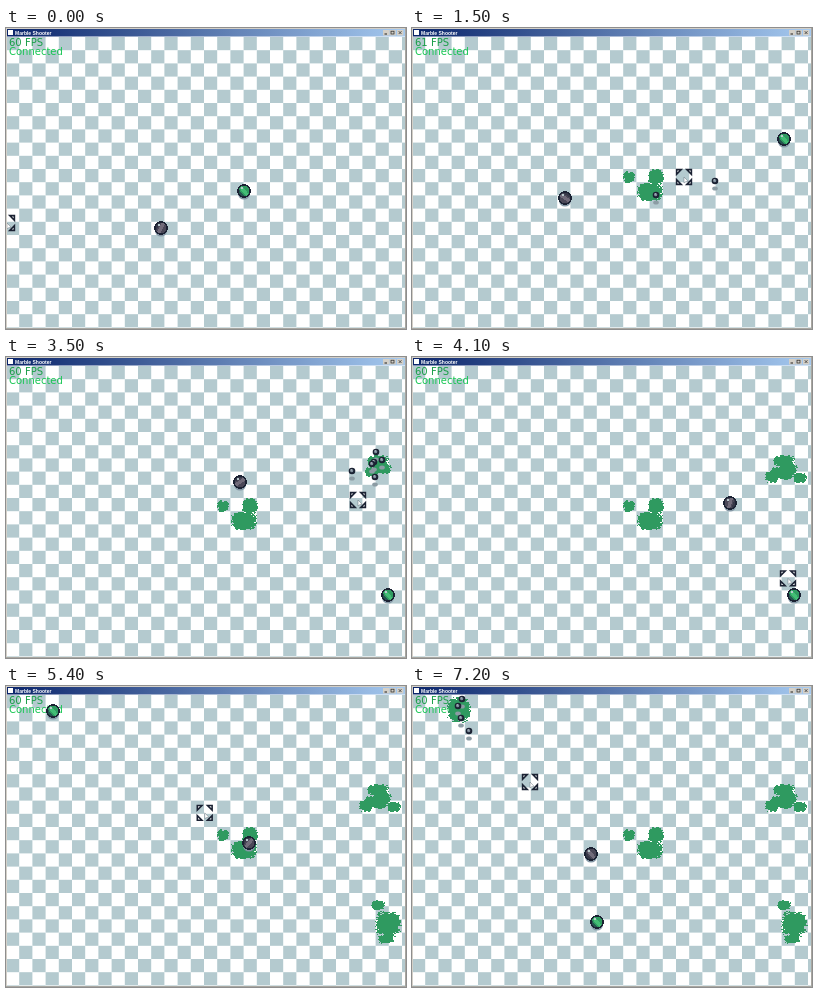
Recreate the animation shown at these times as an HTML page with a canvas. Size 400 by 301 pixels, loop 7.3 s.

```html
<!DOCTYPE html>
<html lang="en">
<head>
<meta charset="utf-8">
<title>Marble Shooter</title>
<style>
html, body { margin: 0; width: 100%; height: 100%; overflow: hidden; background: #fff; }
canvas { display: block; }
</style>
</head>
<body>
<canvas id="stage" width="400" height="301"></canvas>
<script>
const ctx = document.getElementById('stage').getContext('2d');
const LOOP = 7300, STEP = 100, TILE = 13.2, TOP = 9;
const INK = '#1b2233', PAINT = '#2f9a60', FLOOR = '#b4cacf';

// Paths: [time, x, y]
const playerPath = [[0, 155, 200], [300, 155, 200], [900, 153, 170], [1500, 153, 170], [2200, 237, 125],
  [3500, 234, 125], [4250, 339, 151], [4700, 339, 151], [5900, 175, 162], [6100, 175, 162], [7200, 179, 168]];
const aimPath = [[0, 1, 195], [600, 236, 165], [1500, 272, 149], [2100, 369, 125], [2600, 369, 136],
  [3500, 352, 143], [4250, 382, 241], [4700, 382, 241], [5000, 377, 236], [5700, 65, 45], [6100, 65, 45], [7200, 118, 96]];
const targets = [[0, 238, 163], [1200, 372, 111], [3200, 382, 238], [5100, 47, 25], [7000, 185, 236]];

// Shots: [fired, time at point, x, y, stops there]
const shots = [[600, 1000, 238, 163, 1], [700, 1200, 236, 162, 1], [750, 1500, 303, 153], [1050, 1500, 244, 167],
  [2000, 2600, 387, 122], [2050, 2600, 358, 114], [2500, 3200, 372, 111, 1],
  [2830, 3500, 370, 95], [2840, 3500, 369, 120], [2850, 3500, 368, 105],
  [2860, 3500, 376, 103], [2880, 3500, 366, 107], [2940, 3500, 346, 114],
  [4280, 4700, 384, 222], [4360, 4700, 371, 211], [4440, 4700, 360, 199], [4590, 4700, 348, 171],
  [6060, 7000, 47, 25, 1], [6190, 7200, 50, 13], [6205, 7200, 46, 20], [6260, 7200, 49, 32], [6330, 7200, 57, 45]];

// Paint blobs: [time, x, y, rx, ry]
const blobs = [[1200, 217, 149, 6, 6], [1200, 244, 149, 8, 8], [1200, 238, 164, 13, 10],
  [3200, 372, 104, 11, 6], [3200, 376, 112, 10, 5], [3200, 365, 115, 6, 5],
  [3600, 360, 120, 7, 6], [3600, 374, 119, 8, 4], [3600, 388, 121, 7, 5],
  [5100, 372, 219, 7, 5], [5100, 382, 238, 13, 13], [5100, 380, 253, 8, 5], [7000, 47, 24, 12, 13]];

function along(path, t) {
  const i = path.findIndex(p => p[0] > t);
  if (i < 0) return path[path.length - 1].slice(1);
  const [t0, x0, y0] = path[i - 1], [t1, x1, y1] = path[i];
  const k = (t - t0) / (t1 - t0);
  return [x0 + (x1 - x0) * k, y0 + (y1 - y0) * k];
}

function hash(x, y) {
  const v = Math.sin(x * 12.9898 + y * 78.233) * 43758.5453;
  return v - Math.floor(v);
}

function rect(x, y, w, h, color) {
  ctx.fillStyle = color;
  ctx.fillRect(x, y, w, h);
}

function oval(x, y, rx, ry, color) {
  ctx.fillStyle = color;
  ctx.beginPath();
  ctx.ellipse(x, y, rx, ry, 0, 0, Math.PI * 2);
  ctx.fill();
}

function label(text, x, y, font, color) {
  ctx.font = font;
  ctx.fillStyle = color;
  ctx.fillText(text, x, y);
}

function drawFloor() {
  rect(0, 0, 400, 301, '#fff');
  for (let row = 0; row < 23; row++)
    for (let col = row % 2; col < 31; col += 2)
      rect(col * TILE, TOP + row * TILE, TILE, TILE, FLOOR);
}

function drawBlob([, cx, cy, rx, ry]) {
  for (let y = Math.floor(cy - ry); y <= cy + ry; y++)
    for (let x = Math.floor(cx - rx); x <= cx + rx; x++) {
      const d = Math.abs((x + .5 - cx) / rx) ** 3 + Math.abs((y + .5 - cy) / ry) ** 3;
      const rough = hash(Math.floor(x / 2), y) * .75;
      if (d + rough < 1.15) rect(x, y, 1, 1, PAINT);
    }
}

function drawMarble([cx, cy], colors, angle) {
  const [base, dark, light] = colors, ox = Math.round(cx), oy = Math.round(cy);
  oval(ox, oy + 3, 6, 5.5, '#8497a5');
  for (let y = -7; y < 7; y++)
    for (let x = -7; x < 7; x++) {
      const px = x + .5, py = y + .5, r = Math.hypot(px, py);
      if (r > 6.8) continue;
      const band = px * Math.cos(angle) + py * Math.sin(angle);
      let color = Math.abs(band) < 1.7 ? light : band < -3 ? dark : base;
      if (r > 5.3) color = INK;
      else if (Math.hypot(px + 2, py + 3) < 1.1) color = '#b9c9cd';
      rect(ox + x, oy + y, 1, 1, color);
    }
}

function drawShot([fired, at, x1, y1, stops], t) {
  if (t < fired || (stops && t >= at)) return;
  const [x0, y0] = along(playerPath, fired), k = (t - fired) / (at - fired);
  const x = x0 + (x1 - x0) * k, y = y0 + (y1 - y0) * k;
  oval(x, y + 7.5, 2.8, 2, '#8c9ca4');
  oval(x, y, 3.3, 3.3, INK);
  oval(x - .3, y - .3, 1.6, 1.6, '#7f8d9b');
  rect(x - 1.3, y - 1.6, 1, 1, '#d5e0e2');
}

function drawAim([x, y]) {
  ctx.save();
  ctx.translate(x, y);
  ctx.lineWidth = 1.6;
  ctx.strokeStyle = INK;
  ctx.fillStyle = '#fff';
  for (let i = 0; i < 4; i++) {
    ctx.beginPath();
    ctx.moveTo(7.4, -7.4);
    ctx.lineTo(2.8, -7.4);
    ctx.lineTo(7.4, -2.8);
    ctx.closePath();
    ctx.fill();
    ctx.stroke();
    ctx.rotate(Math.PI / 2);
  }
  ctx.beginPath();
  ctx.moveTo(0, 0);
  ctx.lineTo(0, 6);
  ctx.lineTo(1.6, 4.8);
  ctx.lineTo(4.2, 4.4);
  ctx.closePath();
  ctx.lineWidth = .5;
  ctx.strokeStyle = '#66727c';
  ctx.fill();
  ctx.stroke();
  ctx.restore();
}

function drawWindow() {
  const bar = ctx.createLinearGradient(0, 0, 400, 0);
  bar.addColorStop(0, '#0a246a');
  bar.addColorStop(1, '#a6caf0');
  rect(0, 0, 400, 1, '#d4d0c8');
  rect(1, 1, 398, 7.5, bar);
  rect(0, 0, 1, 301, '#d4d0c8');
  rect(399, 0, 1, 301, '#a9a7a1');
  rect(0, 300, 400, 1, '#a9a7a1');
  rect(2, 2, 5, 5, '#fff');
  label('Marble Shooter', 9, 6.7, 'bold 5px "Liberation Sans", sans-serif', '#fff');
  for (const x of [377, 383.5, 391]) rect(x, 2, 6.3, 5.5, '#d4d0c8');
  rect(378.5, 5.5, 2.5, 1, '#222');
  ctx.strokeStyle = '#222';
  ctx.lineWidth = .7;
  ctx.strokeRect(385, 3.2, 3, 2.8);
  ctx.beginPath();
  ctx.moveTo(392.7, 3.2);
  ctx.lineTo(395.5, 6);
  ctx.moveTo(395.5, 3.2);
  ctx.lineTo(392.7, 6);
  ctx.stroke();
}

function draw(t) {
  drawFloor();
  const font = '10px "DejaVu Sans", sans-serif';
  const fps = t >= 1400 && t < 1800 ? 61 : 60;
  label(fps + ' FPS', 3, 18, font, '#1a9e48');
  label('Connected', 3, 27, font, '#16c552');
  blobs.filter(b => t >= b[0]).forEach(drawBlob);

  const player = along(playerPath, t);
  const target = targets.filter(p => t >= p[0]).pop().slice(1);
  drawMarble(target, ['#2f9a60', '#24544f', '#43bd75'], -.7);
  drawMarble(player, ['#4b4858', '#353747', '#716b7a'], (player[0] + player[1]) / 7);
  shots.forEach(s => drawShot(s, t));
  drawAim(along(aimPath, t));
  drawWindow();
}

const start = performance.now();
function tick() {
  const t = (performance.now() - start) % LOOP;
  draw(Math.floor(t / STEP) * STEP);
  requestAnimationFrame(tick);
}
tick();
</script>
</body>
</html>
```
